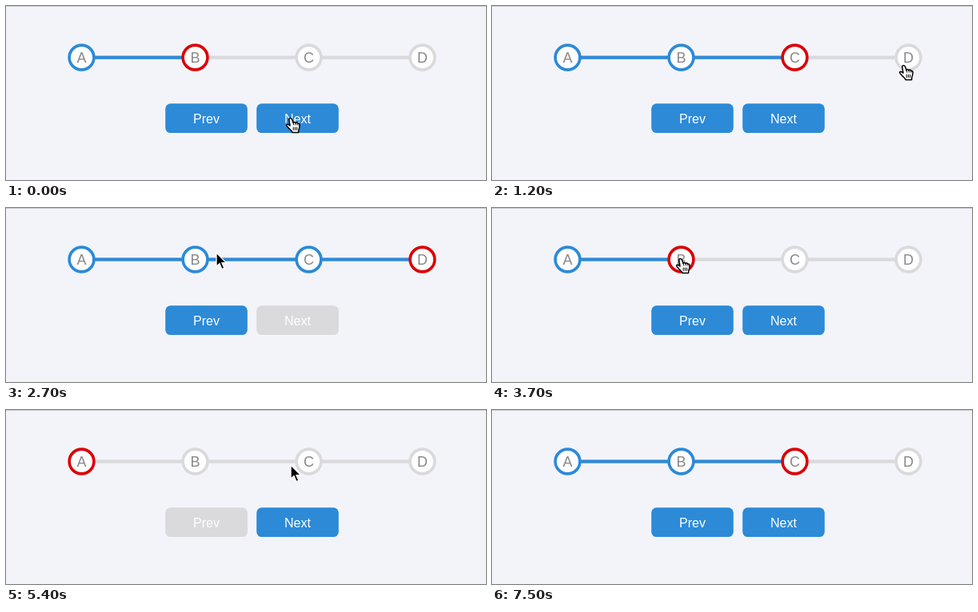
Recreate the animation shown at these times as an HTML page. Size 600 by 218 pixels, loop 7.6 s.

```html
<!DOCTYPE html>
<html lang="en">
<head>
<meta charset="utf-8">
<title>Progress steps</title>
<style>
  html, body { margin: 0; width: 100%; height: 100%; overflow: hidden; background: #f3f4fa; }
  svg { display: block; width: 600px; height: 218px; }
  text { font-family: "Liberation Sans", Arial, sans-serif; text-anchor: middle; }
  #steps circle { fill: #fefefe; stroke-width: 3.6; }
  #steps text { font-size: 18px; fill: #88878a; }
  #buttons text { font-size: 16px; fill: #fff; }
</style>
</head>
<body>
<svg viewBox="0 0 600 218">
  <rect width="600" height="218" fill="#f3f4fa"/>
  <rect width="600" height="1" fill="#c9cacd"/>
  <rect x="94.5" y="62.4" width="426" height="4.2" fill="#dad9db"/>
  <rect id="bar" x="94.5" y="62.4" height="4.2" fill="#2c8ad7"/>
  <g id="steps"></g>
  <g id="buttons"></g>
  <g id="cursor">
    <g id="hand" stroke="#000" stroke-linejoin="round" stroke-linecap="round">
      <path fill="#fff" stroke-width="1.5" d="M-2.3 1.8C-1.8 0 .6-.1 1.3 1.8L3 6.3C3.6 5.1 5.4 5.1 5.9 6.5 6.8 5.5 8.3 5.9 8.6 7.2 9.8 6.7 10.9 7.5 11 8.7 11.3 11 10.6 13.2 9.8 15.2L9.6 18.4H2C1.6 16.6-1 14.8-2.4 13.2-3.4 11.8-5.6 10.6-5.4 9.2-5 7.8-3.2 8-1 10Z"/>
      <path fill="none" stroke-width="1" d="M3 6.3l.9 2.8M5.9 6.5l.6 2.4M8.6 7.2l.3 2M3.2 12v3.4M5.4 12v3.4M7.6 12v3.4"/>
    </g>
    <g id="arrow">
      <path fill="#000" stroke="#fff" stroke-width="1.3" d="M0 0V17.2L3.9 13.6 6.8 20.6 9.8 19.3 6.9 12.6H12.3Z"/>
    </g>
    <g id="banned" fill="none">
      <circle cx="11.2" cy="28" r="9" fill="#e4e4e6" stroke="#fff" stroke-width="4.4"/>
      <path d="M5.2 22L17.2 34" stroke="#fff" stroke-width="4"/>
      <circle cx="11.2" cy="28" r="8.8" stroke="#85858a" stroke-width="2.2"/>
      <path d="M5 21.8L17.4 34.2" stroke="#85858a" stroke-width="2.2"/>
    </g>
  </g>
</svg>
<script>
const LOOP = 7600, FADE = 400;
const BLUE = [44, 138, 215], RED = [218, 0, 6], GREY = [218, 217, 219];
const FIRST = 94.5, GAP = 142, MID = 64.5;

// [time, newly active step]
const clicks = [[-1000, 1], [220, 2], [1680, 3], [3150, 1], [4440, 0], [5850, 2]];
// [time, x, y] of the pointer tip
const path = [
  [0, 356, 140], [850, 356, 140], [1180, 515, 74], [2220, 515, 74],
  [2700, 263, 56], [3000, 236, 63], [3960, 236, 63], [4330, 234, 141],
  [4760, 234, 141], [5400, 356, 69], [5530, 356, 69], [5720, 377, 68],
  [6620, 377, 68], [6900, 374, -26], [LOOP, 374, -26]
];

const $ = id => document.getElementById(id);
const mix = (a, b, k) => a + (b - a) * k;
const rgb = c => `rgb(${c.map(Math.round)})`;

function add(parent, tag, attrs, text) {
  const el = document.createElementNS(parent.namespaceURI, tag);
  for (const key in attrs) el.setAttribute(key, attrs[key]);
  if (text) el.textContent = text;
  return parent.appendChild(el);
}

const rings = [..."ABCD"].map((letter, i) => {
  const x = FIRST + i * GAP;
  const ring = add($("steps"), "circle", { cx: x, cy: MID, r: 15.4 });
  add($("steps"), "text", { x, y: 70.6 }, letter);
  return ring;
});

function makeButton(label, x, blockedAt, pressAt) {
  const group = add($("buttons"), "g", {});
  const face = add(group, "rect", { x, y: 122.3, width: 102.6, height: 36.8, rx: 6.5 });
  add(group, "text", { x: x + 51.3, y: 146.7 }, label);
  return { group, face, x, blockedAt, pressAt };
}
const buttons = [makeButton("Prev", 199.2, 0, 4440), makeButton("Next", 313.2, 3, 220)];

// CSS "ease": cubic-bezier(.25, .1, .25, 1)
function ease(x) {
  if (x <= 0 || x >= 1) return x <= 0 ? 0 : 1;
  let lo = 0, hi = 1;
  for (let i = 0; i < 20; i++) {
    const s = (lo + hi) / 2;
    if (.75 * s * (1 - s) + s * s * s < x) lo = s; else hi = s;
  }
  return .3 * lo * (1 - lo) ** 2 + 3 * lo * lo * (1 - lo) + lo ** 3;
}

function pointerAt(t) {
  const i = path.findIndex(p => p[0] > t);
  const [t0, x0, y0] = path[i - 1], [t1, x1, y1] = path[i];
  const u = (t - t0) / (t1 - t0), k = u * u * (3 - 2 * u);
  return [mix(x0, x1, k), mix(y0, y1, k)];
}

const stepColor = (i, active) => i < active ? BLUE : i === active ? RED : GREY;
const show = (id, on) => $(id).setAttribute("display", on ? "inline" : "none");

function render(t) {
  let n = clicks.length - 1;
  while (clicks[n][0] > t) n--;
  const [start, active] = clicks[n];
  const before = n ? clicks[n - 1][1] : active;
  const k = ease((t - start) / FADE);

  $("bar").setAttribute("width", mix(before, active, k) * GAP);
  rings.forEach((ring, i) => {
    const from = stepColor(i, before), to = stepColor(i, active);
    ring.setAttribute("stroke", rgb(from.map((c, j) => mix(c, to[j], k))));
  });

  const [x, y] = pointerAt(t);
  let hand = rings.some((_, i) => Math.hypot(x - FIRST - i * GAP, y - MID) < 17.2);
  let banned = false;
  for (const b of buttons) {
    const blocked = active === b.blockedAt;
    const pressed = t >= b.pressAt - 90 && t < b.pressAt;
    const cx = b.x + 51.3, cy = 140.7;
    b.face.setAttribute("fill", rgb(blocked ? GREY : BLUE));
    b.group.setAttribute("transform",
      pressed ? `translate(${cx} ${cy}) scale(.98) translate(${-cx} ${-cy})` : "");
    if (x > b.x && x < b.x + 102.6 && y > 122.3 && y < 159.1) {
      hand = !blocked;
      banned = blocked;
    }
  }
  $("cursor").setAttribute("transform", `translate(${x} ${y})`);
  show("hand", hand);
  show("arrow", !hand);
  show("banned", banned);
}

const begin = performance.now();
function tick() {
  render((performance.now() - begin) % LOOP);
  requestAnimationFrame(tick);
}
tick();
</script>
</body>
</html>
```
